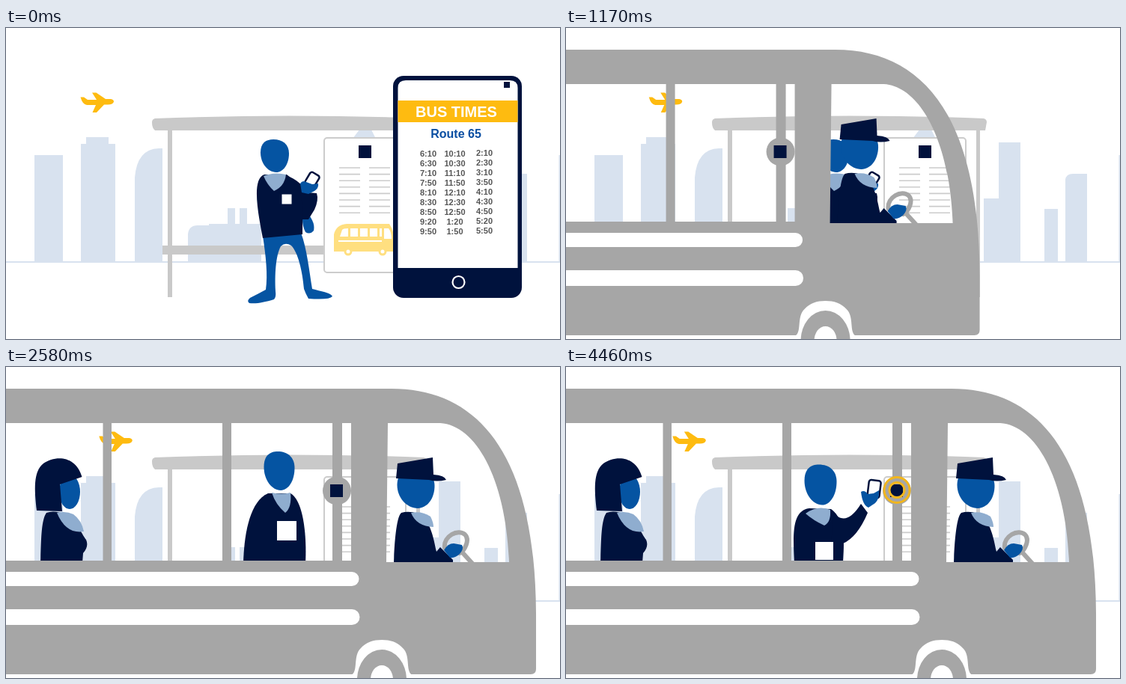
An HTML page that plays this animation: 740 by 416 pixels, repeating every 4500 ms.

```html
<!DOCTYPE html>
<html lang="en">
<head>
<meta charset="utf-8">
<title>Catching the bus</title>
<style>
html, body { margin: 0; height: 100%; overflow: hidden; background: #fff; }
svg { display: block; width: 100vw; height: 100vh; }
text { font-family: "Liberation Sans", Arial, sans-serif; font-weight: bold; text-anchor: middle; }
.navy { fill: #00123d; }
.blue { fill: #0554a2; }
.pale { fill: #d8e2ef; }
.collar { fill: #8fadcf; }
.gray { fill: #a6a6a6; }
.shelter { fill: #c9c9c9; }
.gold { fill: #febb10; }
.white { fill: #fff; }
.line { fill: none; stroke-linecap: round; stroke-linejoin: round; }
.device { fill: #fff; stroke: #00123d; stroke-width: 2.5; }
</style>
</head>
<body>
<svg viewBox="0 0 740 416">
  <defs>
    <path id="face" d="M-1 -.2C-1 -.8 -.6 -1 -.1 -1C.55 -1 1 -.7 1 -.15C1 .5 .6 1 .1 1C-.5 1 -1 .45 -1 -.2Z"/>
  </defs>
  <g class="pale">
    <path d="M38 170H76V313H38Z M100 155H107V146H137V155H146V313H100Z M172 313V200Q175 162 204 161H209V313Z"/>
    <path d="M243 313V276Q244 264 256 264H271V262H296V241H306V262H312V241H322V262H341V313Z M463 148L472 136H488L494 148Z"/>
    <path d="M558 313V228H578V153H607V313Z M639 242H657V313H639Z M667 313V203Q668 195 677 195H696V313Z M738.5 170H740V313H738.5Z M0 312H740V314H0Z"/>
  </g>
  <path id="plane" class="gold" d="M99.500 92.500H104L109 96H121L115 86.500H120.500L133 95H140Q144 95.500 144 98.500Q143 102.500 136 102.500H131L121 113H115.500L120 103H108Q102 102 99.500 92.500Z"/>

  <g class="shelter">
    <path d="M195 126Q195 122 199 121Q380 114 558 121Q562 122 562 126L560 137H199Q195 134 195 126Z"/>
    <path d="M216 137H222V360H216Z M548 137H553V360H548Z M209 291H550V303H209Z"/>
  </g>
  <g id="sign">
    <rect x="425" y="147" width="109" height="180" rx="4" fill="#fff" stroke="#ccc" stroke-width="2"/>
    <rect class="navy" x="471" y="157" width="17" height="17"/>
    <g id="lines" stroke="#ccc" stroke-width="1.6"></g>
    <path fill="#ffdf80" d="M438 299V276Q441 263 455 262H512Q521 275 519 299Z"/>
    <path class="white" d="M446 279L449 270Q450 268 457 268V279Z M460 268H470V279H460Z M473 268H483V279H473Z M486 268H496V279H486Z M499 268H502V279H499Z M505 268H511Q515 273 515 282H505Z M444 284H502V286H444Z"/>
    <g fill="#fff" stroke="#ffdf80" stroke-width="3"><circle cx="457" cy="299" r="4"/><circle cx="503" cy="299" r="4"/></g>
  </g>

  <g id="legs">
    <path class="blue" d="M343 278L394 274C402 295 405 325 409 349C420 352 434 354 436 359Q432 364 404 362Q400 355 398 349C396 325 390 300 381 291Q373 286 367 292C360 305 359 330 360 352Q361 360 358 363C345 367 335 369 325 368Q321 365 326 361Q338 355 347 350C350 330 347 305 343 278Z"/>
    <path class="blue" d="M396 256L406 252Q413 262 411 271Q406 277 400 273Q396 265 396 256Z"/>
    <path class="navy" d="M372 196C390 203 398 212 403 220L415 221Q418 230 412 243L404 256L390 256Z"/>
    <rect class="device" x="402" y="194" width="14" height="18" rx="3" transform="rotate(31 409 203)"/>
    <path class="blue" d="M393 208Q396 203 401 206L409 209L417 208Q418 214 412 218L404 222L395 220Z"/>
  </g>
  <path id="body" class="navy"/>
  <path id="sleeve" class="navy"/>
  <path id="collar" class="collar"/>
  <use id="head" href="#face" class="blue"/>
  <rect id="badge" class="white"/>
  <g id="hand">
    <rect class="device" x="-4" y="-25" width="16" height="23" rx="3" transform="rotate(7)"/>
    <path class="blue" d="M-12 -9Q-7 -12 -3 -6L5 -7L12 -11Q13 0 7 6L-2 12Q-10 9 -12 -9Z"/>
  </g>

  <g id="bus">
    <ellipse class="blue" cx="85" cy="167" rx="14" ry="23"/>
    <path class="navy" d="M41 192C38 165 36 140 50 129C66 118 93 118 101.500 147L72 157L75 193Z"/>
    <path class="navy" d="M46 262C47 230 47 205 54 195Q64 191 80 197C96 207 100 222 107 231Q111 240 103 249L102 262Z"/>
    <path class="collar" d="M68 195Q80 192 90 197Q101 205 104 220Q80 224 68 195Z"/>

    <use href="#face" class="blue" transform="translate(547.5 163) scale(25 26)"/>
    <path class="navy" d="M523 129L570 121L571 144Q586 145 588 151Q575 154 565 151L521 149Z"/>
    <path class="navy" d="M518 262C519 230 522 200 528 195Q538 192 550 196C568 203 572 235 575 247L580 241L597 258V262Z"/>
    <path class="collar" d="M541 195Q555 192 567 200Q571 208 571 214Q548 213 541 195Z"/>
    <path class="line" stroke="#a6a6a6" stroke-width="6" d="M586 242C584 226 604 216 613 224C620 231 613 245 606 249M605 243L624 264"/>
    <path class="blue" d="M585 245Q590 236 598 236L609 238Q612 243 606 250Q600 256 593 255Z"/>

    <path class="gray" fill-rule="evenodd" d="M-400 29H515C630 29 707 115 708 330V404Q708 411 701 411H-400Z
      M-20 75H129.500V259H-20Z M141 75H289V259H141Z M301 75H436V259H301Z M449 75H461V259H449Z
      M510 75H580C628 78 668 150 672 261H508Z"/>
    <path class="white" d="M-400 274H462A9.500 9.500 0 0 1 462 293H-400Z M-400 324H462A10 10 0 0 1 462 345H-400Z"/>
    <path class="white" d="M461 412C471 408 463 386 474 376C481 368 491 365 502 365C513 365 523 368 530 376C541 386 533 408 543 412Z"/>
    <ellipse class="gray" cx="502" cy="418" rx="33" ry="40"/>
    <ellipse class="white" cx="502" cy="418" rx="15" ry="19"/>
    <circle class="gray" cx="442" cy="165.500" r="19"/>
    <rect class="navy" x="433" y="157" width="17" height="17"/>
    <g id="rings" fill="none" stroke="#f2b61d" stroke-width="3">
      <circle cx="442" cy="164.500"/><circle cx="442" cy="164.500"/>
    </g>
  </g>

  <g id="phone">
    <rect class="navy" x="517" y="64" width="172" height="297" rx="14"/>
    <path class="white" d="M523.500 321V80Q523.500 70 534 70H673Q683.500 70 683.500 80V321Z"/>
    <rect class="navy" x="665" y="72" width="8" height="8"/>
    <rect class="gold" x="523.500" y="97" width="160" height="29"/>
    <text class="white" x="601.500" y="119" font-size="20">BUS TIMES</text>
    <text x="601" y="147" font-size="16" fill="#0a4ea2">Route 65</text>
    <g id="times" font-size="11" fill="#555"></g>
    <circle cx="604.500" cy="340" r="8" fill="none" stroke="#fff" stroke-width="2.200"/>
  </g>
</svg>
<script>
const $ = id => document.getElementById(id);
const LOOP = 4500;

const columns = [
  [564, 172, '6:10 6:30 7:10 7:50 8:10 8:30 8:50 9:20 9:50'],
  [599.5, 172, '10:10 10:30 11:10 11:50 12:10 12:30 12:50 1:20 1:50'],
  [639, 171, '2:10 2:30 3:10 3:50 4:10 4:30 4:50 5:20 5:50']
];
$('times').innerHTML = columns.map(([x, y, list]) => list.split(' ').map((time, i) =>
  `<text x="${x}" y="${y + i * 13.05}">${time}</text>`).join('')).join('');
$('lines').innerHTML = Array.from({ length: 8 }, (_, i) =>
  `<path d="M445 ${187 + i * 8.6}h28m12 0h28"/>`).join('');

// The passenger's poses: head is cx cy rx ry, badge is cx cy size.
const waiting = {
  body: 'M345 196C329 202 335 240 343 281L396 276C396 240 400 215 375 196Z',
  collar: 'M344 198Q358 192 374 196Q372 212 358 218Q349 210 344 198Z',
  head: '359 171 19 22', badge: '375 229 13'
};
const turning = { ...waiting, badge: '374 236 21' };
const boarding = {
  body: 'M365 203C346 206 347 235 348 262L409 262C409 235 408 212 393 204Z',
  collar: 'M363 206Q378 200 393 204Q390 222 378 227Q368 218 363 206Z',
  head: '381 178 18 23', badge: '383 246 20'
};
const aboard = {
  body: 'M350 169C325 180 318 225 317 262L400 262C402 225 397 178 380 169Z',
  collar: 'M355 168Q368 171 380 168Q382 188 373 195Q360 184 355 168Z',
  head: '365 139 20.5 26', badge: '375 219 26'
};
const standing = {
  body: 'M325 189C302 192 303 222 305 262L370 262C371 240 375 205 354 190Z',
  collar: 'M320 196Q336 184 353 191Q354 208 345 212Q330 205 320 196Z',
  head: '340 157.5 21.5 27', badge: '345 246 24'
};
const poses = [[0, waiting], [1150, waiting], [1420, turning], [1880, boarding],
  [2580, aboard], [3250, standing], [LOOP, standing]];

const ramp = (t, from, to) => {
  const k = Math.min(1, Math.max(0, (t - from) / (to - from)));
  return k * k * (3 - 2 * k);
};
// Blends the numbers of two strings of the same form.
const mix = (a, b, k) => {
  const goal = b.match(/[\d.]+/g);
  let i = 0;
  return a.replace(/[\d.]+/g, n => (+n + (goal[i++] - n) * k).toFixed(2));
};
const set = (node, attrs) => {
  for (const name in attrs) node.setAttribute(name, attrs[name]);
};
const show = (node, on) => set(node, { visibility: on ? 'visible' : 'hidden' });

function drawPassenger(t) {
  const i = poses.findIndex(([time]) => time > t) - 1;
  const [from, a] = poses[i], [to, b] = poses[i + 1];
  const blend = part => mix(a[part], b[part], ramp(t, from, to));
  const [cx, cy, rx, ry] = blend('head').split(' ').map(Number);
  const [x, y, size] = blend('badge').split(' ').map(Number);
  set($('body'), { d: blend('body') });
  set($('collar'), { d: blend('collar') });
  set($('head'), { transform: `translate(${cx} ${cy}) scale(${rx} ${ry})` });
  set($('badge'), { x: x - size / 2, y: y - size / 2, width: size, height: size });
  show($('legs'), t < 1420);

  const raise = ramp(t, 2680, 3280), reach = ramp(t, 3500, 4200);
  const hx = 368 + 31 * raise + 7 * reach, hy = 292 - 107 * raise - 9 * reach;
  const ex = 368 + 3 * raise + 3 * reach, ey = 246 - 21 * raise - 2 * reach;
  set($('sleeve'), {
    d: `M${cx + 17} ${cy + 37}Q${ex} ${ey - 8} ${hx - 12} ${hy + 7}L${hx - 3} ${hy + 19}
      Q${ex + 15} ${ey + 5} ${ex - 4} ${ey + 13}L${cx + 14} ${cy + 84}Z`
  });
  set($('hand'), { transform: `translate(${hx} ${hy})` });
  show($('sleeve'), t > 2680);
  show($('hand'), t > 2680);
}

function draw(now) {
  const t = now % LOOP;
  const left = Math.max(0, 2050 - t) / 1130;
  set($('plane'), { transform: `translate(${t * 0.0096} 0)` });
  set($('bus'), { transform: `translate(${-272 * left ** 2.228} 0)` });
  set($('phone'), { opacity: 1 - ramp(t, 940, 1080) });
  drawPassenger(t);
  show($('rings'), t > 4180);
  [...$('rings').children].forEach((ring, i) => {
    const phase = ((t + 40) / 400 + 0.68 + i / 2) % 1;
    set(ring, { r: 4 + 14 * phase });
  });
  requestAnimationFrame(() => draw(performance.now()));
}
draw(performance.now());
</script>
</body>
</html>
```
